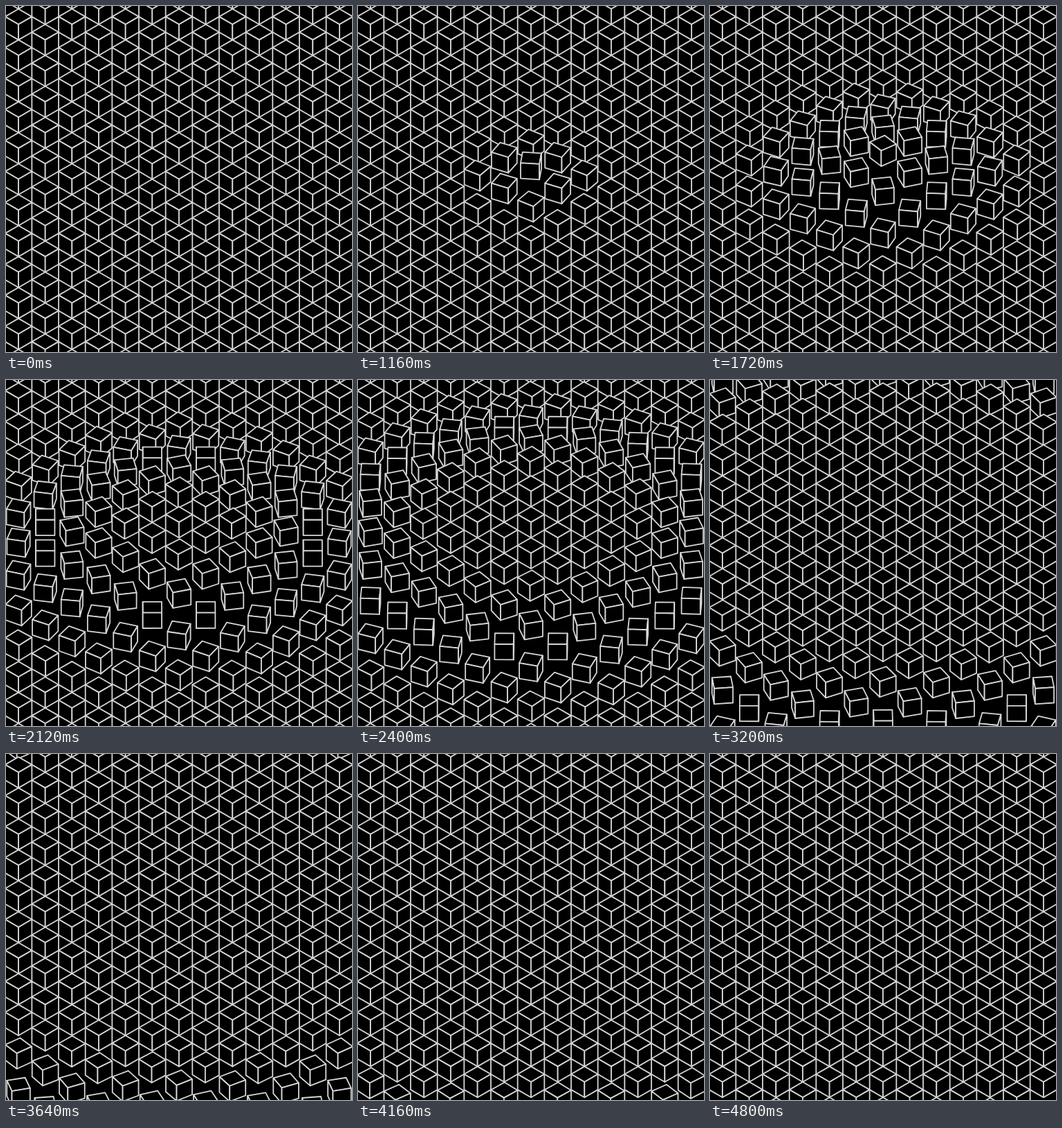
Write an HTML page with a canvas that moves like this. It is 500 by 499 pixels and loops after 4840 ms.

```html
<!DOCTYPE html>
<html lang="en">
<head>
<meta charset="utf-8">
<title>Turning cubes</title>
<style>
  html, body { margin: 0; width: 100%; height: 100%; overflow: hidden; background: #000; }
  canvas { display: block; }
</style>
</head>
<body>
<canvas id="stage" width="500" height="499"></canvas>
<script>
const ctx = document.getElementById('stage').getContext('2d');
const WIDTH = 500, HEIGHT = 499, CX = 250, CY = 249.75;
const LOOP = 4840, STEP = 40;
const RADIUS = 19.33;                  // half diagonal of a cube's top face
const TILT = 1 / Math.sqrt(3);         // isometric foreshortening of the floor
const EDGE = 2 * RADIUS * TILT;        // projected height of a vertical edge
const REACH = 9;                       // grid extent in each floor direction
const WAVE_HALF = 2.9, WAVE_START = -WAVE_HALF, WAVE_TRAVEL = 15.7;

const clamp = v => Math.min(1, Math.max(0, v));
const smooth = v => v * v * (3 - 2 * v);
const powerEase = (v, power) => v < 0.5
  ? 0.5 * (2 * v) ** power
  : 1 - 0.5 * (2 - 2 * v) ** power;

const cubes = [];
for (let i = -REACH; i <= REACH; i++) {
  for (let j = -REACH; j <= REACH; j++) {
    const x = CX + (i - j) * 2 * RADIUS;
    const y = CY + (i + j) * EDGE;
    if (x > -RADIUS && x < WIDTH + RADIUS && y > -2 * EDGE && y < HEIGHT + 4 * EDGE)
      cubes.push({ x, y, distance: Math.hypot(i, j) });
  }
}
cubes.sort((a, b) => a.y - b.y);

function face(points) {
  ctx.beginPath();
  points.forEach(([x, y]) => ctx.lineTo(x, y));
  ctx.closePath();
  ctx.fill();
  ctx.stroke();
}

function drawCube(x, y, turn) {
  // Corners run from front to right, back and left.
  const top = [0, 1, 2, 3].map(n => {
    const angle = turn + n * Math.PI / 2;
    return [x + RADIUS * Math.sin(angle), y + RADIUS * TILT * Math.cos(angle) - EDGE / 2];
  });
  const drop = ([px, py]) => [px, py + EDGE];
  const [front, right, , left] = top;
  face(top);
  face([left, front, drop(front), drop(left)]);
  if (right[0] > front[0]) face([front, right, drop(right), drop(front)]);
  // Past the half turn the corner behind the left one comes into view.
  else face([right, front, drop(front), drop(right)]);
}

function draw(time) {
  const t = clamp(time / (LOOP - STEP));
  const wave = WAVE_START + WAVE_TRAVEL * powerEase(t, 1.5);
  ctx.fillStyle = '#000';
  ctx.fillRect(0, 0, WIDTH, HEIGHT);
  ctx.strokeStyle = '#d6d6d6';
  ctx.lineWidth = 1.8;
  ctx.lineJoin = 'round';
  for (const { x, y, distance } of cubes) {
    const q = smooth(clamp(0.5 + (wave - distance) / (2 * WAVE_HALF)));
    // Each cube turns a quarter while rising into the next cell.
    const quarter = q * Math.PI / 2;
    drawCube(x, y - 2 * EDGE * q, q > 0.5 ? quarter - Math.PI / 2 : quarter);
  }
}

function tick() {
  const time = performance.now() % LOOP;
  draw(Math.floor(time / STEP) * STEP);
  requestAnimationFrame(tick);
}
tick();
</script>
</body>
</html>
```
